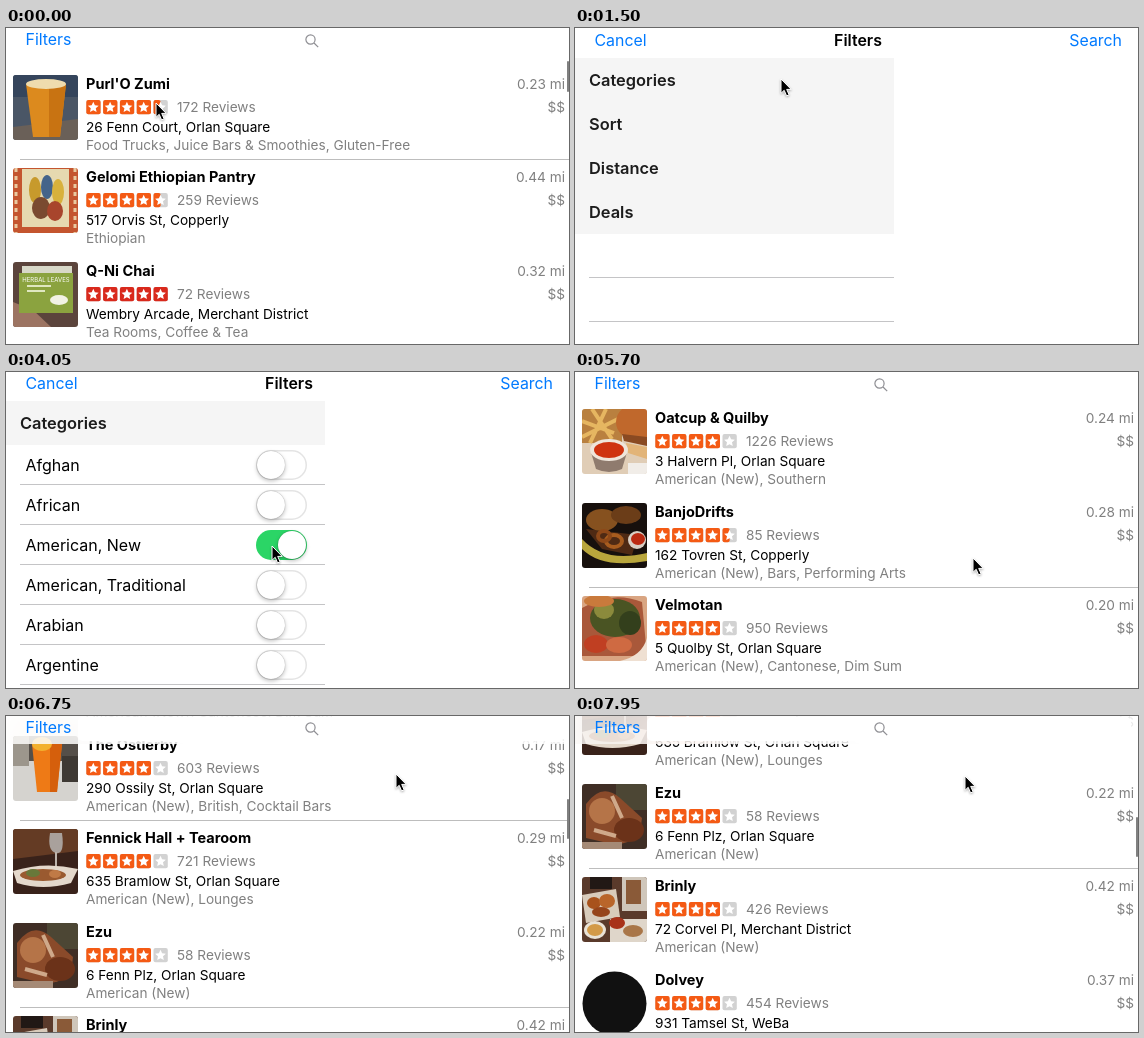
Recreate the animation shown at these times as an HTML page. Size 563 by 316 pixels, loop 8000 ms.

```html
<!DOCTYPE html>
<html lang="en">
<head>
<meta charset="utf-8">
<title>Restaurant filters</title>
<style>
  html, body { margin: 0; width: 100%; height: 100%; overflow: hidden; background: #fff; }
  body { position: relative; font: 13.65px/20px Inter, "Open Sans", sans-serif; color: #000; }
  div, span { white-space: nowrap; }
  .list, .panel, .cursor, .row, .row > *, .nav, .nav > *, .bar, .head, .line, .option, .group { position: absolute; }
  .list, .panel { inset: 0; overflow: hidden; }
  .panel { background: #fff; font-size: 16px; }

  .row { left: 0; top: 0; width: 100%; height: 93px; }
  .photo { left: 7px; top: 0; width: 65px; height: 65px; border-radius: 3px; overflow: hidden; }
  .name { left: 80px; top: -1px; font-size: 14.5px; font-weight: 700; }
  .stars { left: 80px; top: 25px; }
  .reviews { left: 171px; top: 22px; }
  .address { left: 80px; top: 42px; }
  .kind { left: 80px; top: 60px; }
  .miles { right: 4px; top: -1px; }
  .price { right: 4px; top: 22px; }
  .reviews, .kind, .miles, .price { color: #808080; }
  .rule { left: 14px; right: 0; top: 84px; height: 1px; background: #bdbdbd; }
  .bar { left: 561px; width: 2px; border-radius: 1px; background: #808080; }

  .nav { left: 0; top: 0; width: 100%; height: 28px; font-size: 15.9px; }
  .nav.glass { background: rgba(255, 255, 255, .78); backdrop-filter: blur(22px) saturate(1.8); }
  .nav > span { top: 2px; color: #007aff; }
  .nav .title { left: 0; width: 566px; text-align: center; font-weight: 600; color: #000; }
  .field { left: 72px; top: 1px; width: 484px; height: 24px; border-radius: 5px; background: #fff; }
  .lens { left: 298px; top: 5px; }

  .group { inset: 0; }
  .head { left: 0; width: 319px; height: 44px; line-height: 45px; text-indent: 14px; font-size: 16.4px; font-weight: 600; color: #1c1c1c; background: #f5f5f5; }
  .line { left: 14px; width: 305px; height: 1px; background: #c4c4c6; }
  .option { left: 19.5px; width: 300px; height: 40px; line-height: 40px; }
  .switch { position: absolute; left: 230.5px; top: 5px; width: 51px; height: 30px; border-radius: 15px; box-shadow: inset 0 0 0 1.5px #e4e4e4; }
  .switch::after { content: ""; position: absolute; left: 1px; top: 1px; width: 28px; height: 28px; border-radius: 50%; background: #fff; box-shadow: 0 2px 4px rgba(0, 0, 0, .25), 0 0 1px rgba(0, 0, 0, .4); }
  .switch.on { background: #2bd566; box-shadow: none; }
  .switch.on::after { left: 22px; }
  .cursor { left: -1px; top: -1px; filter: drop-shadow(0 1px 1px rgba(0, 0, 0, .3)); }
</style>
</head>
<body>
<div class="list" id="nearby"></div>
<div class="list" id="results"></div>
<div class="bar" id="bar"></div>
<div class="nav glass">
  <div class="field"></div>
  <span style="left:19.5px">Filters</span>
  <svg class="lens" width="16" height="16" fill="none" stroke="#8e8e93" stroke-width="1.2"><circle cx="6.5" cy="6.5" r="4.6"/><path d="M10 10l4.2 4.2"/></svg>
</div>
<div class="panel" id="panel">
  <div class="group" id="closed"></div>
  <div class="group" id="open"></div>
  <div class="head" style="top:29px">Categories</div>
  <div class="nav">
    <span class="title">Filters</span>
    <span style="left:19.5px">Cancel</span>
    <span style="right:16px">Search</span>
  </div>
</div>
<svg class="cursor" id="cursor" width="14" height="20" viewBox="-1 -1 14 20"><path d="M0 0v14.3l3.2-3 2.4 5.6 2.5-1.1-2.4-5.4h4.5z" stroke="#fff" stroke-width="1" stroke-linejoin="round"/></svg>

<script>
const LOOP = 8000, STEP = 150, PITCH = 93.5, FIRST = 37;
const $ = id => document.getElementById(id);

// Photo shapes on a 65 x 65 square
const rect = (x, y, w, h, fill, more = '') => `<rect x="${x}" y="${y}" width="${w}" height="${h}" fill="${fill}" ${more}/>`;
const oval = (x, y, rx, ry, fill, more = '') => `<ellipse cx="${x}" cy="${y}" rx="${rx}" ry="${ry}" fill="${fill}" ${more}/>`;
const path = (d, fill, more = '') => `<path d="${d}" fill="${fill}" ${more}/>`;
const stroke = (d, color, width) => path(d, 'none', `stroke="${color}" stroke-width="${width}"`);
const back = fill => rect(0, 0, 65, 65, fill);

const photos = {
  juice: back('#4a5666') + rect(0, 0, 65, 22, '#35455c') + path('M0 52L65 44V65H0z', '#6a6058') +
    path('M13 9H53L47 62H20z', '#dc8a1e') + path('M36 9H53L47 62H36z', '#c87312') + oval(33, 9, 20, 5, '#efdcae'),
  painting: back('#c4552f') + path('M3 0V65M62 0V65', 'none', 'stroke="#e9c9a0" stroke-width="3" stroke-dasharray="4 4"') +
    rect(9, 1, 47, 58, '#e6d9b0') + oval(22, 22, 6, 13, '#c79a2c') + oval(34, 19, 6, 12, '#44648a') +
    oval(45, 24, 6, 13, '#d8b13c') + oval(28, 40, 9, 11, '#7a4a30') + oval(42, 43, 8, 10, '#a8452c'),
  tea: back('#5b443c') + path('M0 40L20 48 38 65H0z', '#9c7462') + rect(9, 4, 50, 8, '#d8d8c8') + rect(6, 11, 54, 40, '#8ba33f') +
    '<text x="33" y="20" font-size="6" text-anchor="middle" fill="#fff">HERBAL LEAVES</text>' +
    rect(14, 23, 24, 2, '#dfe7c0') + rect(14, 28, 18, 2, '#dfe7c0') + oval(46, 38, 9, 5, '#f2f2e4'),
  fries: back('#e0cdb6') + rect(0, 0, 40, 34, '#b9803f') + stroke('M0 12L32 24M0 28L36 10M10 0L30 30M24 0L8 34', '#e6b661', 4) +
    oval(54, 13, 20, 18, '#c0682c') + path('M40 25L65 28V37L42 32z', '#8a4a22') + path('M44 34L65 38V50L46 44z', '#e2b478') +
    path('M8 40H46L40 60Q27 66 14 60z', '#8f7b6e') + oval(27, 41, 19, 11, '#efe5da') + oval(27, 41, 15, 8, '#cf3310') + rect(46, 54, 19, 11, '#f1ede8'),
  basket: back('#17100d') + path('M0 36Q22 60 65 50V58Q20 66 0 46z', '#b9a63c') + path('M4 26L20 46 50 52 56 32z', '#4f2a14') +
    oval(20, 17, 16, 11, '#86511f') + oval(44, 12, 15, 9, '#6b3d18') + oval(55, 37, 9, 9, '#d9cfc4') + oval(56, 36, 7, 6, '#bb2a12') +
    oval(32, 38, 8, 6, 'none', 'stroke="#a85c1e" stroke-width="4"') + oval(22, 33, 6, 5, 'none', 'stroke="#8e4818" stroke-width="4"'),
  salad: back('#d9a582') + path('M0 12Q30 -6 60 6L65 60H0z', '#a9583a') + oval(33, 22, 25, 19, '#4a5423') + oval(22, 14, 10, 9, '#8b8a3c') +
    oval(48, 27, 11, 12, '#333f1c') + oval(17, 5, 15, 6, '#c97a3c') + oval(14, 48, 12, 9, '#c03f22') + oval(37, 49, 13, 8, '#cf6a42') +
    path('M65 42V65H38Q60 60 65 42z', '#efe0d2'),
  spritz: back('#d5d3cf') + rect(0, 0, 65, 25, '#554f49') + rect(0, 0, 16, 30, '#9c968c') + rect(49, 20, 16, 26, '#3e3934') +
    path('M19 8H49L44 56H24z', '#ee7a16') + path('M37 8H49L44 56H37z', '#d55f0c') + oval(29, 8, 10, 7, '#f3b12e'),
  plate: back('#39221a') + path('M0 0H65V22L0 30z', '#643b24') + path('M37 4Q34 22 43 24T49 4z', '#a9a19c') + rect(42, 23, 2, 16, '#bdb4ac') +
    path('M0 42Q32 32 65 40L58 54Q30 62 4 54z', '#e4d8cb') + oval(30, 46, 23, 6, '#9a5a30') + oval(20, 44, 7, 4, '#68783a') + oval(42, 45, 6, 4, '#c07a46'),
  roast: back('#3f2e25') + rect(34, 0, 31, 26, '#4c4634') + path('M4 20Q20 -2 38 14L60 34Q58 62 30 60L4 54z', '#8a4a2a') +
    oval(20, 27, 13, 13, '#b57448') + oval(47, 46, 15, 12, '#6b3219') + stroke('M30 12L40 34M12 46L34 52', '#cfa98a', 4) + rect(0, 58, 40, 7, '#a58a76'),
  platters: back('#5a3a2b') + rect(8, 0, 22, 12, '#211815') + rect(40, 0, 25, 34, '#cfc6ba') + rect(44, 3, 15, 24, '#8a5a38') +
    path('M0 18L34 12 38 40 4 46z', '#d8cbbb') + oval(12, 26, 7, 6, '#a8521c') + oval(25, 24, 8, 7, '#b9652a') + oval(19, 35, 9, 5, '#96441a') +
    oval(13, 53, 11, 9, '#e9e2d6') + oval(13, 53, 8, 6, '#d39a48') + rect(28, 42, 37, 23, '#dfd6ca') + oval(35, 46, 8, 6, '#a8321a') + oval(51, 54, 10, 6, '#a97648'),
  badge: back('#fff') + oval(32.5, 32.5, 32, 32, '#111')
};

const STAR = 'M7 1.8l1.6 3.5 3.8.4-2.9 2.6.8 3.8L7 10.2l-3.3 1.9.8-3.8-2.9-2.6 3.8-.4z';
function stars(score) {
  const color = score === 5 ? '#d9291c' : '#f45a14';
  let out = '';
  for (let i = 0; i < 5; i++) {
    const part = Math.max(0, Math.min(1, score - i));
    out += `<g transform="translate(${i * 16.8 + .3})">` + rect(0, 0, 14.3, 14.3, '#d2d2d2', 'rx="2"') +
      (part ? rect(0, 0, 14.3 * part, 14.3, color, 'rx="2"') : '') + path(STAR, '#fff') + '</g>';
  }
  return `<svg class="stars" width="83" height="15">${out}</svg>`;
}

function addRows(list, rows) {
  list.innerHTML = rows.map(([photo, name, score, reviews, address, kind, miles]) => `<div class="row">
    <svg class="photo" viewBox="0 0 65 65">${photos[photo]}</svg>
    <div class="name">${name}</div>${stars(score)}
    <div class="reviews">${reviews} Reviews</div>
    <div class="address">${address}</div>
    <div class="kind">${kind}</div>
    <div class="miles">${miles} mi</div><div class="price">$$</div>
    <div class="rule"></div></div>`).join('');
}

addRows($('nearby'), [
  ['juice', "Purl'O Zumi", 4.5, 172, '26 Fenn Court, Orlan Square', 'Food Trucks, Juice Bars &amp; Smoothies, Gluten-Free', '0.23'],
  ['painting', 'Gelomi Ethiopian Pantry', 4.5, 259, '517 Orvis St, Copperly', 'Ethiopian', '0.44'],
  ['tea', 'Q-Ni Chai', 5, 72, 'Wembry Arcade, Merchant District', 'Tea Rooms, Coffee &amp; Tea', '0.32']
]);
addRows($('results'), [
  ['fries', 'Oatcup &amp; Quilby', 4, 1226, '3 Halvern Pl, Orlan Square', 'American (New), Southern', '0.24'],
  ['basket', 'BanjoDrifts', 4.5, 85, '162 Tovren St, Copperly', 'American (New), Bars, Performing Arts', '0.28'],
  ['salad', 'Velmotan', 4, 950, '5 Quolby St, Orlan Square', 'American (New), Cantonese, Dim Sum', '0.20'],
  ['spritz', 'The Ostlerby', 4, 603, '290 Ossily St, Orlan Square', 'American (New), British, Cocktail Bars', '0.17'],
  ['plate', 'Fennick Hall + Tearoom', 4, 721, '635 Bramlow St, Orlan Square', 'American (New), Lounges', '0.29'],
  ['roast', 'Ezu', 4, 58, '6 Fenn Plz, Orlan Square', 'American (New)', '0.22'],
  ['platters', 'Brinly', 4, 426, '72 Corvel Pl, Merchant District', 'American (New)', '0.42'],
  ['badge', 'Dolvey', 4, 454, '931 Tamsel St, WeBa', 'American (New)', '0.37']
]);

$('closed').innerHTML =
  ['Sort', 'Distance', 'Deals'].map((s, i) => `<div class="head" style="top:${73 + i * 44}px">${s}</div>`).join('') +
  [248, 292].map(y => `<div class="line" style="top:${y}px"></div>`).join('');
$('open').innerHTML =
  ['Afghan', 'African', 'American, New', 'American, Traditional', 'Arabian', 'Argentine'].map((s, i) =>
    `<div class="option" style="top:${73 + i * 40}px">${s}<div class="switch"></div></div>
     <div class="line" style="top:${112 + i * 40}px"></div>`).join('');
const chosen = document.querySelectorAll('.switch')[2];

// Keys are [time, ...values]
function track(keys, t, ease = u => u) {
  const i = keys.findIndex(k => k[0] > t);
  if (i < 0) return keys[keys.length - 1].slice(1);
  const [a, b] = [keys[i - 1] || keys[i], keys[i]];
  const u = b === a ? 0 : ease((t - a[0]) / (b[0] - a[0]));
  return a.slice(1).map((v, n) => v + (b[n + 1] - v) * u);
}
const smooth = u => u * u * (3 - 2 * u);

const pointer = [
  [0, 150, 75], [150, 150, 75], [900, 42, 9], [1050, 42, 9], [1500, 206, 51], [1800, 209, 58],
  [2550, 209, 58], [3450, 271, 181], [3600, 266, 174], [4050, 266, 174], [4950, 530, 6],
  [5700, 398, 186], [5850, 398, 186], [6600, 390, 58], [7800, 390, 58], [7950, 390, 60]
];
const sheet = [
  [0, 400], [1050, 400], [1200, 230], [1350, 45], [1500, 1], [1650, 0],
  [4950, 0], [5100, 30], [5250, 230], [5400, 400]
];
const unfold = [[0, 0], [2100, 0], [2400, 1]];
const barFade = [[0, 1], [150, 1], [600, 0], [5850, 0], [6150, 1]];

function placeRows(list, scroll) {
  [...list.children].forEach((row, i) => {
    const y = FIRST + i * PITCH - scroll;
    row.style.transform = `translateY(${Math.round(y)}px)`;
    // The hairline only shows when it falls on a whole pixel
    row.lastElementChild.hidden = y % 1 === 0;
  });
}
const half = v => Math.round(v * 2) / 2;

function draw(t) {
  const [x, y] = track(pointer, t, smooth);
  const found = t >= 5550;
  let scroll = -9.5 * Math.exp(-t / 180);
  // Drag with the pointer, then glide to a stop
  if (found) scroll = t < 6450 ? 186 - y : 448 - 150 * Math.exp((6750 - t) / 458);

  $('cursor').style.transform = `translate(${x}px, ${y}px)`;
  $('nearby').hidden = found;
  $('results').hidden = !found;
  placeRows(found ? $('results') : $('nearby'), half(scroll));

  const bar = $('bar').style;
  bar.opacity = track(barFade, t)[0];
  bar.top = (found ? 46 + scroll / 8 : 33) + 'px';
  bar.height = (found ? 40 : 31) + 'px';

  const [drop] = track(sheet, t);
  $('panel').hidden = drop >= 316;
  $('panel').style.transform = `translateY(${drop}px)`;
  const [shown] = track(unfold, t);
  $('open').style.opacity = shown;
  $('closed').style.opacity = 1 - shown;
  chosen.classList.toggle('on', t >= 4050);
}

const start = performance.now();
function tick(now) {
  const t = Math.max(0, now - start) % LOOP;
  draw(Math.floor(t / STEP) * STEP);
  requestAnimationFrame(tick);
}
draw(0);
requestAnimationFrame(tick);
</script>
</body>
</html>
```
